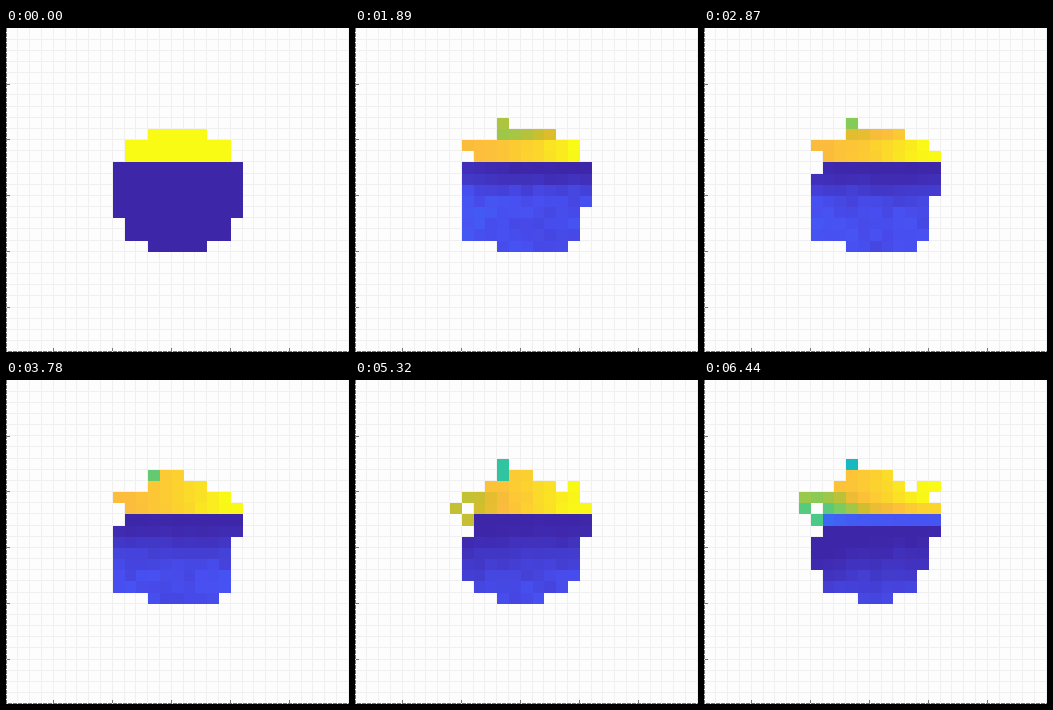
Animation, 343 px wide and 324 px high, one loop 6.51 s. Source, as an HTML page with a canvas:

```html
<!DOCTYPE html>
<html lang="en">
<head>
<meta charset="utf-8">
<title>Two-phase cell drop</title>
<style>
html, body { margin: 0; width: 343px; height: 324px; overflow: hidden; background: #fdfdfd; }
canvas { display: block; }
</style>
</head>
<body>
<canvas width="343" height="324"></canvas>
<script>
const ctx = document.querySelector('canvas').getContext('2d');
const W = 343, H = 324, N = 29, STEP = 70, LOOP = 6510;
const CELL_W = 11.8, CELL_H = 11.16, MID = 14, SEAM = 12;

const edgeX = c => Math.round(CELL_W * c + 0.6);
const edgeY = r => Math.round(CELL_H * r + 0.55);
const clamp = v => Math.max(0, Math.min(1, v));
const ramp = (t, from, to) => clamp((t - from) / (to - from));
const mix = (a, b, f) => a + (b - a) * f;

// Colour scale: position, red, green, blue
const scale = [[0, 62, 38, 168], [12, 72, 80, 242], [25, 46, 135, 247], [37, 10, 177, 214],
  [50, 55, 200, 151], [62, 129, 204, 89], [75, 215, 189, 41], [81, 252, 188, 61],
  [88, 252, 207, 48], [100, 249, 251, 21]];

function colour(value) {
  const v = 100 * clamp(value / 100);
  const i = Math.max(1, scale.findIndex(stop => stop[0] >= v));
  const [p, ...a] = scale[i - 1], [q, ...b] = scale[i];
  return `rgb(${a.map((x, k) => Math.round(mix(x, b[k], ramp(v, p, q))))})`;
}

function rand(a, b, c) {
  const s = Math.sin(a * 12.9898 + b * 78.233 + c * 37.719) * 43758.5453;
  return s - Math.floor(s) - 0.5;
}

// Per-cell noise that drifts slowly
function noise(r, c, t) {
  const k = Math.floor(t / 900);
  return mix(rand(r, c, k), rand(r, c, k + 1), t / 900 - k);
}

// Cells (column, row) that join or leave the drop, in order
const swaps = [
  [17, 19], [9, 18], [9, 17], [9, 10], [12, 8], [19, 16], [9, 12], [19, 15], [19, 11],
  [13, 8], [14, 8], [19, 14], [18, 9], [17, 19], [11, 9], [16, 19], [8, 11], [18, 18],
  [9, 12], [9, 13], [12, 7], [9, 18], [15, 8], [9, 17], [19, 9], [12, 19], [18, 17], [8, 10]];

// Swapping doubles its pace in the second half
const swapCount = t => Math.floor(Math.max(t / 300, 12 + (t - 3780) / 150));

function inDrop(c, r, t) {
  const disc = (c - MID) ** 2 + (r - 14) ** 2 <= 32;
  const flips = swaps.slice(0, swapCount(t)).filter(([x, y]) => x === c && y === r).length;
  return disc !== (flips % 2 === 1);
}

function capValue(c, r, t) {
  const tip = c === 12 && r < (t > 5600 ? 8 : 9);
  if (tip) return 80 - 0.006 * t;
  const settled = 81 + 18 * clamp((c - 9) / 9) ** 1.5;
  let v = mix(100, settled, ramp(t, 0, r < 11 ? 900 : 1800) ** 2);
  if (r <= 9) v -= 18 * ramp(t, 0, 900) * (1 - ramp(t, 1900, 3700));
  else v -= 18 * ramp(t, 4300, 6300) * Math.exp(-(((c - 9) / 3) ** 2));
  if (r >= 11) v -= 10 * ramp(t, 5600, 6200);
  return v + 2 * noise(r, c, t) * ramp(t, 0, 500);
}

function bodyValue(c, r, t) {
  const exchange = ramp(t, 5600, 6200);
  const left = Math.exp(-(c - 9) / 2);
  if (r === SEAM && exchange) return exchange * (13 + 8 * left);
  const depth = (r - SEAM - exchange) / (0.8 + t / 1900);
  const rise = 1 - Math.exp(-depth * depth);
  const side = mix(6, -4, t / LOOP) * left;
  return ramp(t, 0, 500) * (11 * rise + side + 3 * noise(r, c, t) * (0.3 + rise));
}

function drawGrid() {
  ctx.fillStyle = '#fdfdfd';
  ctx.fillRect(0, 0, W, H);
  ctx.fillStyle = '#f0f0f0';
  for (let k = 1; k <= N; k++) {
    ctx.fillRect(Math.floor(CELL_W * k), 0, 1, H);
    ctx.fillRect(0, Math.floor(CELL_H * k), W, 1);
  }
  ctx.strokeStyle = ctx.fillStyle = '#777';
  ctx.setLineDash([4, 1]);
  ctx.beginPath();
  ctx.moveTo(0.5, 0);
  ctx.lineTo(0.5, H - 0.5);
  ctx.lineTo(W, H - 0.5);
  ctx.stroke();
  for (let k = 4; k < N; k += 5) {
    ctx.fillRect(Math.floor(CELL_W * k), H - 4, 1, 3);
    ctx.fillRect(1, H - edgeY(k), 3, 1);
  }
}

function drawDrop(t) {
  for (let r = 7; r < 20; r++)
    for (let c = 8; c < 20; c++) {
      if (!inDrop(c, r, t)) continue;
      // Late on, the cap hangs over the left side of the seam
      const cap = r < SEAM || (r === SEAM && c < 10 && t > 4000);
      ctx.fillStyle = colour((cap ? capValue : bodyValue)(c, r, t));
      const x = edgeX(c), y = edgeY(r);
      ctx.fillRect(x, y, edgeX(c + 1) - x, edgeY(r + 1) - y);
    }
}

function draw() {
  const t = Math.floor(performance.now() % LOOP / STEP) * STEP;
  drawGrid();
  drawDrop(t);
  requestAnimationFrame(draw);
}
draw();
</script>
</body>
</html>
```
